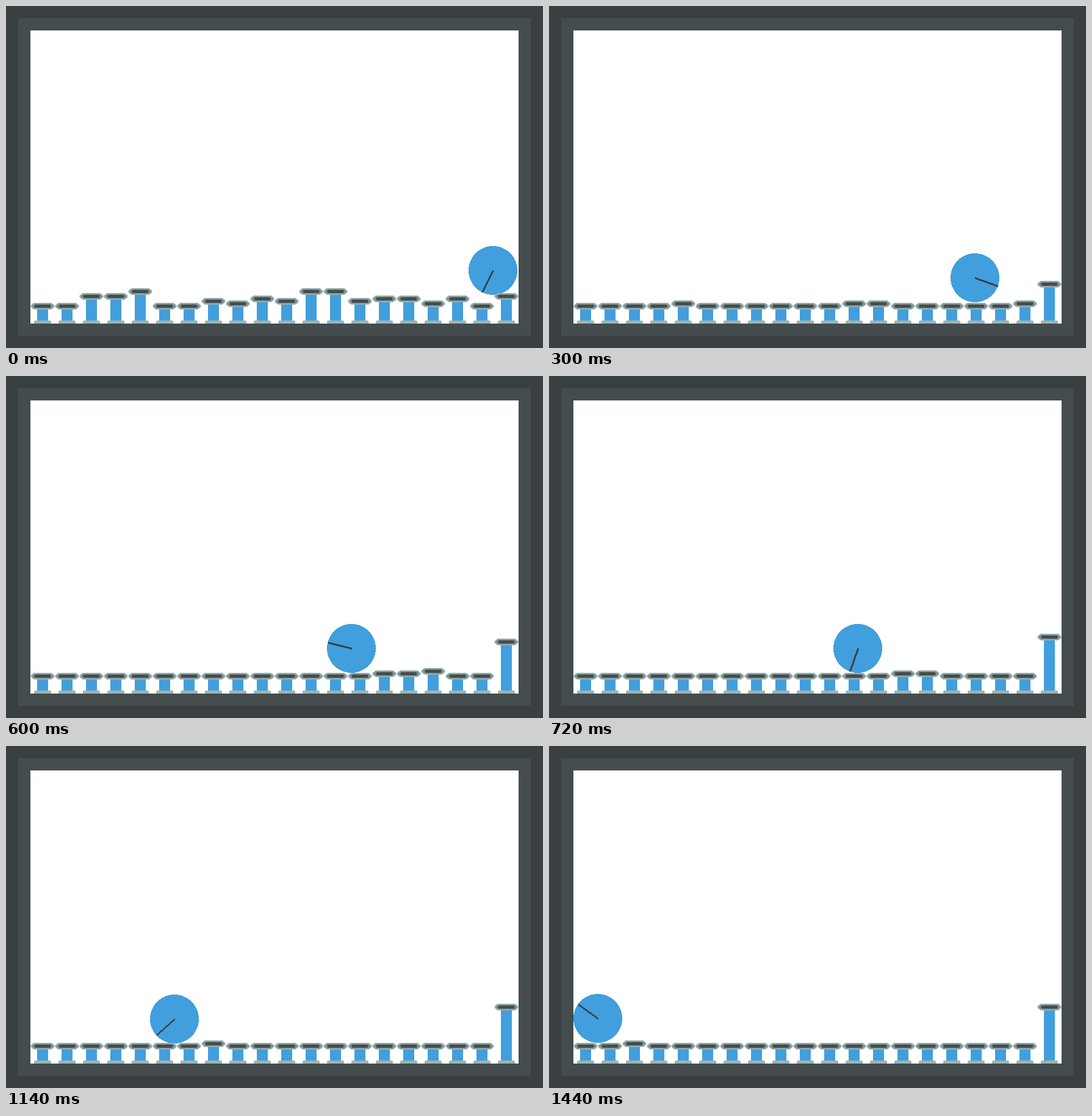
An HTML page with a canvas for the animation above (1500 ms loop, 880 by 560 pixels).

```html
<!DOCTYPE html>
<html lang="en">
<head>
<meta charset="utf-8">
<title>Pistons and ball</title>
<style>
  html, body { margin: 0; width: 100%; height: 100%; overflow: hidden; background: #3a4041; }
  canvas { display: block; }
</style>
</head>
<body>
<canvas id="stage" width="880" height="560"></canvas>
<script>
const ctx = document.getElementById('stage').getContext('2d');
const STEP = 60, STEPS = 25, RADIUS = 40, UNIT = 4, FLOOR = 491;
const DARK = '#3a4041', SLATE = '#444c4d', BLUE = '#419fdd';
const LIGHT = '#9fb4b4', MID = '#7c9190';

// Key poses of the ball
const poses = [
  { k: 0, x: 798, y: 433, deg: 117.5 },
  { k: 1, x: 790, y: 432, deg: 119 },
  { k: 2, x: 769, y: 443, deg: 121 },
  { k: 8, x: 626, y: 446, deg: -81 },
  { k: 12, x: 506, y: 446, deg: -250.6 },
  { k: 16, x: 432, y: 443, deg: -356 },
  { k: 18, x: 354, y: 446, deg: -468 },
  { k: 19, x: 276, y: 447, deg: -581 },
  { k: 24, x: 80, y: 446, deg: -864 }
];

// Piston heights at the start of the loop, in units
const start = [...'00446002132662331304'].map(Number);
const LAST = start.length - 1;

const pistonX = i => 60 + 40 * i;

function ballAt(k) {
  const n = Math.max(1, poses.findIndex(p => p.k >= k));
  const a = poses[n - 1], b = poses[n];
  const mix = key => a[key] + (b[key] - a[key]) * (k - a.k) / (b.k - a.k);
  return { x: Math.round(mix('x')), y: Math.round(mix('y')), deg: mix('deg') };
}

// Pistons sink from the start, then rise in a shrinking wave behind the ball.
// The last one climbs to its limit and stays there.
function height(i, k, ballX) {
  if (i === LAST) return Math.min(16, start[i] + k);
  const gap = pistonX(i) - ballX, reach = 1720 / k;
  const wave = Math.min(Math.floor(gap / 50), Math.ceil((reach - gap) / 30));
  return Math.max(0, start[i] - k, wave);
}

function rect(color, x, y, w, h) {
  ctx.fillStyle = color;
  ctx.fillRect(x, y, w, h);
}

// Bar of half size w by h with its corners cut off
function bar(color, cx, cy, w, h, cutX, cutY) {
  ctx.fillStyle = color;
  ctx.beginPath();
  for (const [sx, sy] of [[1, 1], [-1, 1], [-1, -1], [1, -1]]) {
    const side = [cx + sx * w, cy + sy * (h - cutY)];
    const edge = [cx + sx * (w - cutX), cy + sy * h];
    const ends = sx === sy ? [side, edge] : [edge, side];
    ends.forEach(p => ctx.lineTo(...p));
  }
  ctx.fill();
}

function drawBall({ x, y, deg }) {
  // Hard-edged disc, row by row
  for (let row = -RADIUS; row < RADIUS; row++) {
    const half = Math.round(Math.sqrt(RADIUS ** 2 - (row + 0.5) ** 2));
    rect(BLUE, x - half, y + row, 2 * half, 1);
  }
  // Hard-edged spoke, three pixels thick across its longer axis
  const a = deg * Math.PI / 180;
  const dx = Math.cos(a) * (RADIUS - 1), dy = Math.sin(a) * (RADIUS - 1);
  const flat = Math.abs(dx) > Math.abs(dy);
  const count = Math.round(Math.max(Math.abs(dx), Math.abs(dy)));
  for (let n = 0; n <= count; n++) {
    const px = Math.round(x + dx * n / count), py = Math.round(y + dy * n / count);
    if (flat) rect(DARK, px, py - 1, 1, 3);
    else rect(DARK, px - 1, py, 3, 1);
  }
}

function drawRod(x, y) {
  rect(BLUE, x - 9, y, 18, 515 - y);
  rect(LIGHT, x - 13, 515, 26, 1);
  rect(LIGHT, x - 14, 516, 28, 4);
}

function drawHead(x, y) {
  bar(LIGHT, x, y + 0.5, 19.5, 5.5, 5, 4);
  bar(MID, x, y + 0.5, 17.5, 4, 4, 3);
  bar(SLATE, x, y + 0.5, 13.5, 2.5, 1.5, 1.5);
}

function draw(k) {
  rect(DARK, 0, 0, 880, 560);
  rect(SLATE, 20, 20, 840, 520);
  rect('#fff', 40, 40, 800, 480);
  const ball = ballAt(k);
  const heads = start.map((_, i) => [pistonX(i), FLOOR - UNIT * height(i, k, ball.x)]);
  heads.forEach(p => drawRod(...p));
  drawBall(ball);
  heads.forEach(p => drawHead(...p));
}

function tick() {
  draw(Math.floor(performance.now() / STEP) % STEPS);
  requestAnimationFrame(tick);
}
tick();
</script>
</body>
</html>
```
